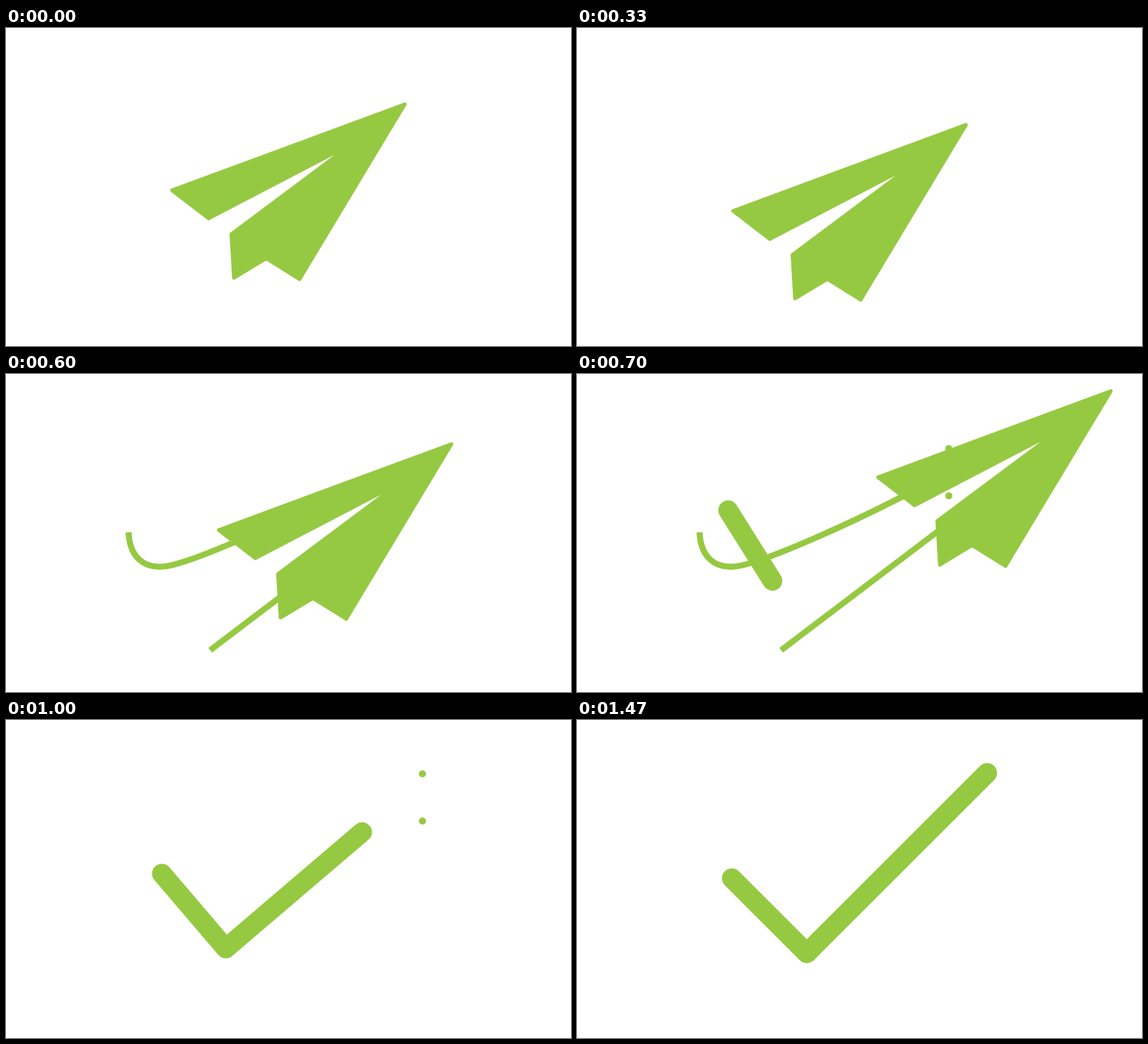
Write an HTML page with a canvas that moves like this. It is 799 px wide and 450 px high and loops after 1.51 s.

```html
<!DOCTYPE html>
<html lang="en">
<head>
<meta charset="utf-8">
<title>Sent</title>
<style>
  html, body { margin: 0; width: 100%; height: 100%; overflow: hidden; background: #fff; }
  canvas { display: block; width: 799px; height: 450px; }
</style>
</head>
<body>
<canvas id="stage" width="799" height="450"></canvas>
<script>
const ctx = document.getElementById('stage').getContext('2d');
const GREEN = '#96c942';
const LOOP = 1510;
const STEP = 100 / 3;
const LAST_STEP = 44;

const PLANE = [
  [570, 103], [416, 359], [368, 329], [320, 358],
  [316, 290.6], [464.5, 179.6], [286.3, 272.6], [229.6, 228.9]
];
const NOTCH = 5;

const CHECK = [[219, 224], [325, 330], [580, 75]];
const SHORT_ARM = distance(CHECK[0], CHECK[1]);
const CHECK_LENGTH = SHORT_ARM + distance(CHECK[1], CHECK[2]);
const PIVOT = [402.8, 146.5];
const TILT = 12.9 * Math.PI / 180;

function distance(a, b) {
  return Math.hypot(b[0] - a[0], b[1] - a[1]);
}
const mix = (a, b, p) => a.map((v, i) => v + (b[i] - v) * p);
const progress = (t, from, to) => Math.min(1, Math.max(0, (t - from) / (to - from)));
const smooth = p => p * p * (3 - 2 * p);

// Dips backwards first, then accelerates to its full reach at u = 1
const swoop = (u, reach, power, dip, decay) =>
  reach * u ** power - dip * u * Math.max(0, 1 - u) ** decay;

// Fast start with a long, soft tail
function settle(p) {
  const q = p ** 0.82;
  return 3.9 * q / (1 + 2.9 * q);
}

function planeOffset(t) {
  const u = t / 800;
  return [swoop(u, 453, 6.4, 102, 1.85), swoop(u, -267, 7.9, -137, 1.23)];
}

function drawTrails(t, planeX) {
  if (t < 530 || t >= 795) return;
  const gone = progress(t, 700, 800) ** 1.5;
  const ribbon = (start, head, build) => {
    const tail = start + (head - start) * gone;
    ctx.save();
    ctx.beginPath();
    ctx.rect(tail, 0, head - tail, 450);
    ctx.clip();
    ctx.beginPath();
    build();
    ctx.stroke();
    ctx.restore();
  };
  ctx.lineWidth = 8.5;
  ctx.lineCap = 'butt';
  ribbon(165, 290 + planeX, () => {
    ctx.moveTo(173.3, 224);
    ctx.bezierCurveTo(174.8, 257, 193.5, 279, 231.5, 271.2);
    ctx.bezierCurveTo(275, 261.5, 380, 214.5, 460, 173.6);
    ctx.lineTo(760, 22);
  });
  ribbon(282, 335 + planeX, () => {
    ctx.moveTo(288.7, 390.8);
    ctx.lineTo(788.5, 11.5);
  });
}

function drawDots(t) {
  if (t < 650) return;
  const drift = 67 * (1 - (1 - Math.min(1, (t - 700) / 370)) ** 1.72);
  const dot = (x, y, end) => {
    if (t > end) return;
    ctx.beginPath();
    ctx.arc(x + drift, y - drift * 0.464, 5, 0, Math.PI * 2);
    ctx.fill();
  };
  dot(525.8, 105.6, 1090);
  dot(525.8, 172.4, 1090);
  dot(600, 164, 950);
}

function pointOnCheck(length) {
  return length < SHORT_ARM
    ? mix(CHECK[0], CHECK[1], length / SHORT_ARM)
    : mix(CHECK[1], CHECK[2], (length - SHORT_ARM) / (CHECK_LENGTH - SHORT_ARM));
}

function drawCheck(t) {
  const grown = settle(progress(t, 662, 1466));
  if (grown <= 0) return;
  const end = grown * CHECK_LENGTH;
  const start = 257 * (grown * (1 - grown)) ** 1.76;
  ctx.save();
  ctx.translate(...PIVOT);
  ctx.rotate(TILT * (1 - smooth(progress(t, 800, 1133))));
  ctx.translate(-PIVOT[0], -PIVOT[1]);
  ctx.lineWidth = 28;
  ctx.lineCap = ctx.lineJoin = 'round';
  ctx.beginPath();
  ctx.moveTo(...pointOnCheck(start));
  if (end > SHORT_ARM) ctx.lineTo(...CHECK[1]);
  ctx.lineTo(...pointOnCheck(end));
  ctx.stroke();
  ctx.restore();
}

function drawPlane(t, x, y) {
  if (t > 880) return;
  ctx.save();
  ctx.translate(x, y);
  ctx.beginPath();
  ctx.moveTo(...mix(PLANE[7], PLANE[0], 0.5));
  PLANE.forEach((corner, i) => {
    const next = PLANE[(i + 1) % PLANE.length];
    ctx.arcTo(...corner, ...next, i === NOTCH ? 0 : 2.5);
  });
  ctx.closePath();
  ctx.fill();
  ctx.restore();
}

function draw(t) {
  const [x, y] = planeOffset(t);
  ctx.fillStyle = '#fff';
  ctx.fillRect(0, 0, 799, 450);
  ctx.fillStyle = ctx.strokeStyle = GREEN;
  drawTrails(t, x);
  drawDots(t);
  drawCheck(t);
  drawPlane(t, x, y);
}

function tick() {
  const t = performance.now() % LOOP;
  const step = Math.min(LAST_STEP, Math.floor((t + 3.4) / STEP));
  draw(step * STEP);
  requestAnimationFrame(tick);
}
tick();
</script>
</body>
</html>
```
